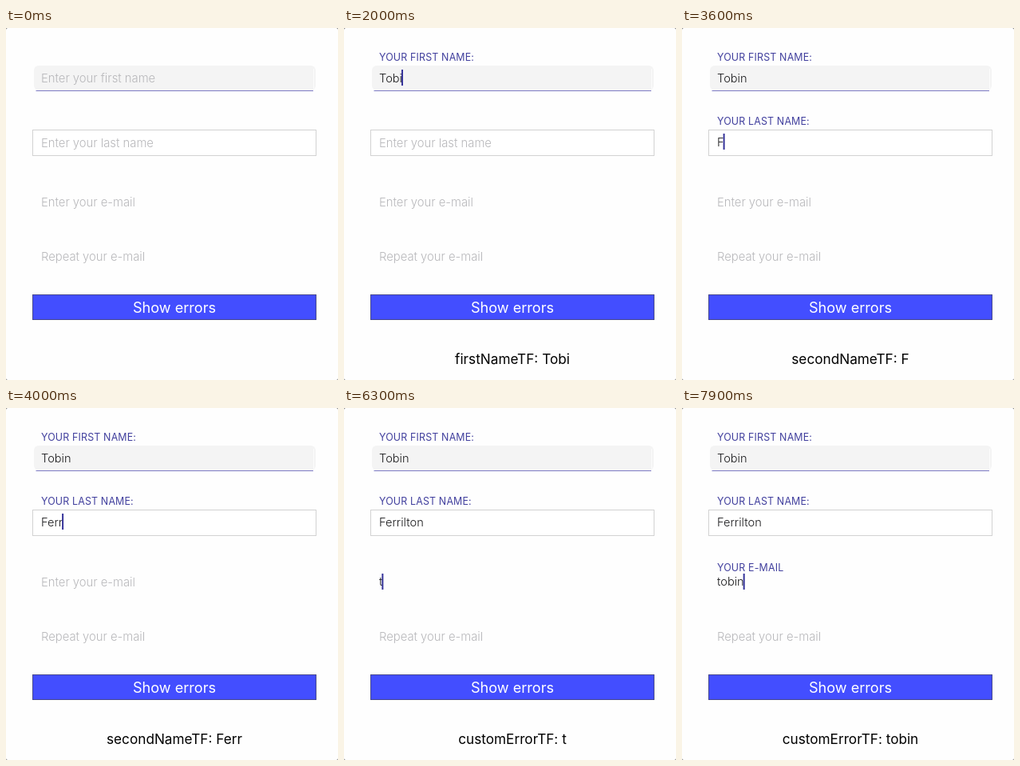
These frames come from a looping animation (416 px wide and 440 px high, 8000 ms). An HTML page:

```html
<!DOCTYPE html>
<html lang="en">
<head>
<meta charset="utf-8">
<title>Form fields</title>
<style>
  html, body { margin: 0; width: 100%; height: 100%; overflow: hidden; background: #777; }
  svg { display: block; width: 416px; height: 440px; font-family: Inter, Roboto, sans-serif; }
  .input { font-size: 14.6px; font-weight: 300; fill: #1c1c1e; }
  .hint { font-size: 14.8px; font-weight: 300; fill: #b8b8bb; }
  .title { font-size: 12.4px; letter-spacing: .18px; fill: #42409e; }
  .button { font-size: 18.1px; fill: #fff; }
  .message { font-size: 17.2px; fill: #000; }
</style>
</head>
<body>
<svg id="stage" viewBox="0 0 416 440">
  <rect width="416" height="440" rx="2.5" fill="#fefefe"/>
  <rect x="35" y="47" width="353" height="31" rx="6" fill="#f4f4f4"/>
  <path d="M385.5 51V76" stroke="#fcfcfc"/>
  <path d="M37.5 78.5H385" stroke="#7d7bc4"/>
  <rect x="33.5" y="127.5" width="355" height="32" fill="#fff" stroke="#d2d2d2"/>
  <rect x="33.5" y="333.5" width="355" height="31" fill="#434eff" stroke="#46488e"/>
  <text class="button" x="211" y="356" text-anchor="middle">Show errors</text>
  <text class="message" id="message" x="211" y="420" text-anchor="middle"></text>
  <rect id="caret" width="2" height="20" fill="#36349a"/>
</svg>
<script>
const LOOP = 8000, LEFT = 44;
const stage = document.getElementById('stage');
const message = document.getElementById('message');
const caret = document.getElementById('caret');

function addText(cls, y, content = '') {
  const el = document.createElementNS('http://www.w3.org/2000/svg', 'text');
  el.setAttribute('class', cls);
  el.setAttribute('x', LEFT);
  el.setAttribute('y', y);
  el.textContent = content;
  stage.insertBefore(el, caret);
  return el;
}

function addField(name, hint, title, hintY, titleY, inputY, caretY) {
  return {
    name, caretY,
    hint: addText('hint', hintY, hint),
    title: addText('title', titleY, title),
    input: addText('input', inputY)
  };
}

const fields = [
  addField('firstNameTF', 'Enter your first name', 'YOUR FIRST NAME:', 68.3, 40.5, 67.6, 52),
  addField('secondNameTF', 'Enter your last name', 'YOUR LAST NAME:', 148.8, 120.8, 148.2, 132),
  addField('customErrorTF', 'Enter your e-mail', 'YOUR E-MAIL', 223.3, 204.4, 222.2, 207)
];
addText('hint', 291.3, 'Repeat your e-mail');

// One entry per focus or key press, the text growing by one letter each time
const type = (field, text, times) =>
  times.map((at, i) => ({ at, field, value: text.slice(0, i) }));

const events = [
  ...type(0, 'Tobin', [100, 1700, 1800, 1900, 2000, 2300]),
  ...type(1, 'Ferrilton', [2800, 3400, 3700, 3900, 4000, 4200, 4300, 4500, 4600, 4800]),
  ...type(2, 'tobin.', [5100, 6300, 6500, 6800, 6900, 7000, 7300]),
  { at: 7900, field: 2, value: 'tobin' }
];

// Caret opacity by time since the last key: hold, fade out, rest, fade in
function blink(age) {
  if (age < 600) return 1;
  if (age < 900) return 1 - (age - 500) / 300;
  if (age < 1100) return 0;
  return Math.min(1, (age - 1000) / 200);
}

function draw(time) {
  const t = Math.floor(time % LOOP / 100) * 100;
  const past = events.filter(e => e.at <= t);
  const last = past[past.length - 1];

  fields.forEach((f, i) => {
    const typed = past.filter(e => e.field === i && e.value);
    const value = typed.length ? typed[typed.length - 1].value : '';
    const p = typed.length ? Math.min(1, (t - typed[0].at) / 200) : 0;
    f.input.textContent = value;
    f.hint.style.opacity = value ? 0 : 1;
    f.title.style.opacity = p;
    f.title.setAttribute('transform', `translate(0 ${14 * (1 - p) ** 2})`);
  });

  caret.style.opacity = last ? blink(t - last.at) : 0;
  message.textContent = '';
  if (last) {
    const f = fields[last.field];
    message.textContent = `${f.name}: ${last.value || 'Did begin editing'}`;
    const width = last.value ? f.input.getComputedTextLength() : 0;
    caret.setAttribute('x', Math.max(LEFT, LEFT + width - 1));
    caret.setAttribute('y', f.caretY);
  }
}

const start = performance.now();
function tick() {
  draw(performance.now() - start);
  requestAnimationFrame(tick);
}
tick();
</script>
</body>
</html>
```
